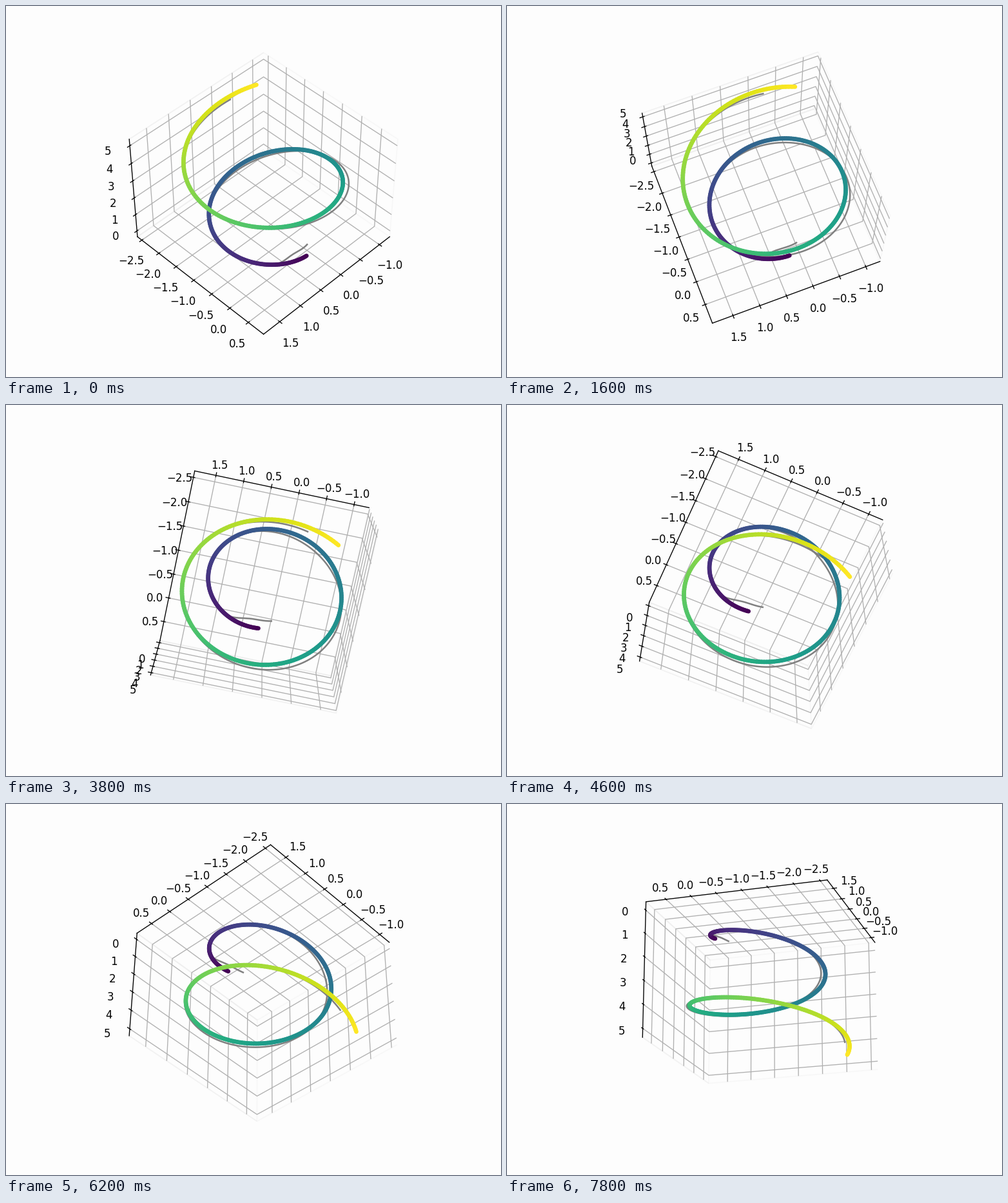
These frames come from a looping animation (768 px wide and 576 px high, 8000 ms). A matplotlib script:

```python
import numpy as np
import matplotlib.pyplot as plt
from matplotlib.animation import FuncAnimation
from mpl_toolkits.mplot3d.art3d import Line3DCollection

FRAMES, INTERVAL = 40, 200
CENTER = (0.2, -0.8)
BG = "#fdfdfd"


def spiral(phase, offset=0.0):
    """Widening turn around CENTER, climbing half a unit per radian."""
    r = np.exp(0.05 * phase) + offset
    return np.column_stack([CENTER[0] + r * np.sin(phase),
                            CENTER[1] + r * np.cos(phase),
                            phase / 2])


def follower():
    """Path from the origin that catches up with the spiral, then wobbles around it."""
    phase = np.linspace(-0.245, 9.66, 500)
    wobble = 0.012 + 0.075 * np.cos(phase) - 0.04 * np.sin(2 * phase)
    catch_up = -0.267 * np.exp(-((phase + 0.2) / 0.7) ** 4)
    path = spiral(phase, wobble + catch_up)
    path[:, 2] += 0.1225 * np.exp(-(phase - phase[0]) / 0.3)
    return path


def limits(lo, hi):
    pad = (hi - lo) * (0.05 + 1.1 / 48)
    return lo - pad, hi + pad


fig = plt.figure(figsize=(6.4, 4.8), dpi=120, facecolor=BG)
ax = fig.add_subplot(projection="3d", facecolor=BG)
for axis in (ax.xaxis, ax.yaxis, ax.zaxis):
    axis.pane.fill = False

t = np.linspace(0, 10, 301)
pts = spiral(t)
ax.plot(*follower().T, color="gray", lw=1.5)
ax.add_collection3d(Line3DCollection(
    np.stack([pts[:-1], pts[1:]], axis=1),
    colors=plt.cm.viridis(t[:-1] / 10), linewidths=4, capstyle="round"))

ax.set_xlim(*limits(-1.07, 1.683), view_margin=0)
ax.set_ylim(*limits(-2.405, 0.68), view_margin=0)
ax.set_zlim(*limits(0, 5), view_margin=0)


def update(i):
    angle = 45 + 3 * i
    ax.view_init(elev=angle, azim=angle)
    return []


anim = FuncAnimation(fig, update, frames=FRAMES, interval=INTERVAL,
                     init_func=lambda: update(0), repeat=True, repeat_delay=0)
plt.show()
```
